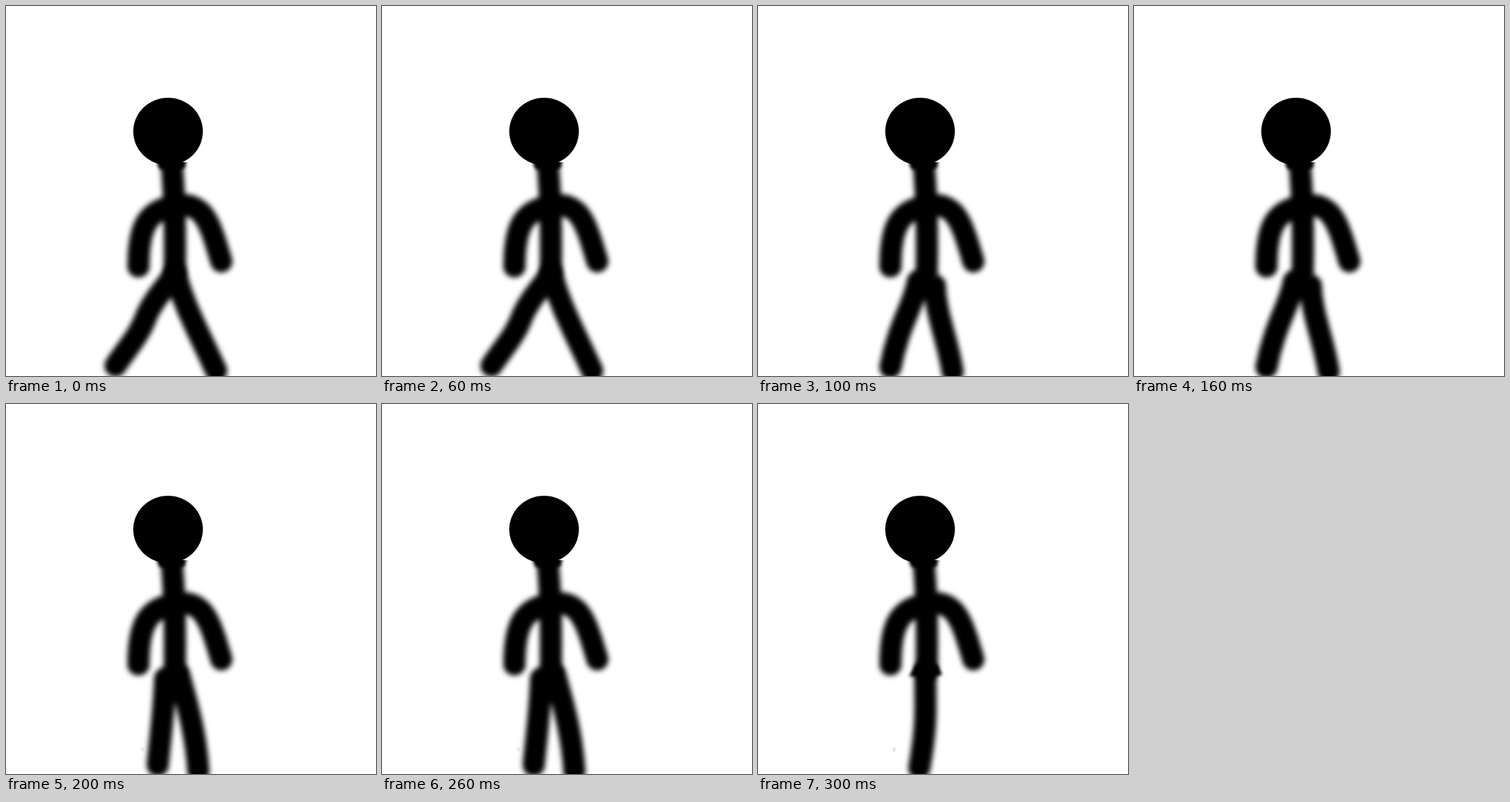
An HTML page that plays this animation: 500 by 500 pixels, repeating every 0.4 s.

```html
<!DOCTYPE html>
<html lang="en">
<head>
<meta charset="utf-8">
<title>Walking figure</title>
<style>
  html, body { margin: 0; width: 100%; height: 100%; overflow: hidden; background: #fff; }
  svg { display: block; width: 100vw; height: 100vh; }
  .brush { fill: none; stroke: #000; stroke-width: 30; stroke-linecap: round; stroke-linejoin: round; filter: url(#soft); }
  .pose { animation: show 400ms step-end infinite; animation-delay: calc(var(--i) * 100ms - 400ms); }
  @keyframes show {
    0% { visibility: visible; }
    25%, 100% { visibility: hidden; }
  }
</style>
</head>
<body>
<svg viewBox="0 0 500 500">
  <defs>
    <filter id="soft" filterUnits="userSpaceOnUse" x="-20" y="-20" width="540" height="580">
      <feGaussianBlur stdDeviation="3.6"/>
    </filter>
    <filter id="fine" filterUnits="userSpaceOnUse" x="0" y="0" width="500" height="500">
      <feGaussianBlur stdDeviation="2"/>
    </filter>
    <clipPath id="belowChin"><path d="M0 211H500V500H0Z"/></clipPath>
  </defs>

  <!-- legs -->
  <g class="pose" style="--i:0">
    <path class="brush" d="M229 361C214 382 200 396 190 418C181 444 164 462 148 486M229 361C240 405 264 448 284 493"/>
  </g>
  <g class="pose" style="--i:1">
    <path class="brush" d="M216 372C211 404 190 430 179 488M239 378C240 416 256 450 263 494"/>
  </g>
  <g class="pose" style="--i:2">
    <path class="brush" d="M215 371C214 410 209 446 205 488M234 366C244 404 256 440 260 496"/>
    <ellipse cx="184" cy="467" rx="2" ry="3" opacity=".08"/>
  </g>
  <g class="pose" style="--i:3">
    <path class="brush" d="M226 360C226 410 229 430 218 492"/>
    <path d="M214 352H242L249 366L236 368H204Z" filter="url(#fine)"/>
    <ellipse cx="184" cy="467" rx="2" ry="3" opacity=".1"/>
  </g>

  <!-- torso and arms -->
  <g clip-path="url(#belowChin)">
    <path d="M203 205H244L242 218L236 221H210L206 218Z" filter="url(#fine)"/>
    <path class="brush" d="M223 205C228 250 229 300 228 360M228 270C190 276 179 300 179 352M232 269C268 266 276 294 291 345"/>
  </g>
  <ellipse cx="219" cy="169.5" rx="47" ry="45.5"/>
</svg>
</body>
</html>
```
